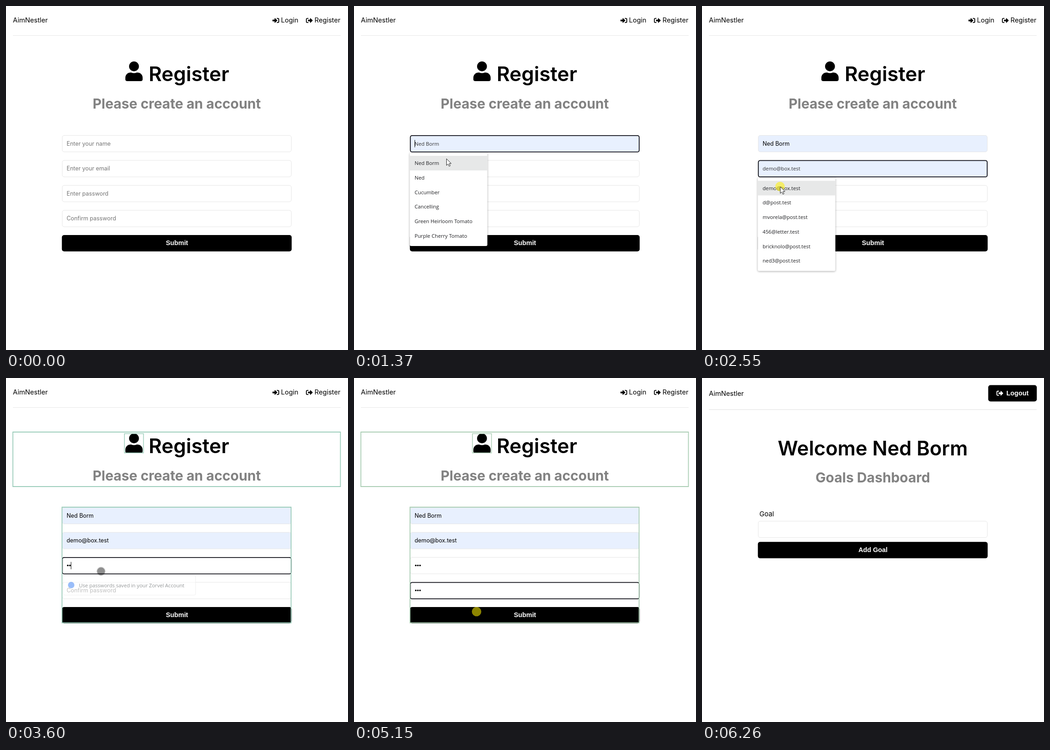
These frames come from a looping animation (745x751 px, 6870 ms). An HTML page with a canvas:

```html
<!DOCTYPE html>
<html lang="en">
<head>
<meta charset="utf-8">
<title>Register form</title>
<style>
  html, body { margin: 0; width: 100%; height: 100%; overflow: hidden; background: #fff; }
  canvas { display: block; }
</style>
</head>
<body>
<canvas id="stage" width="745" height="751"></canvas>
<script>
const ctx = document.getElementById('stage').getContext('2d');
const LOOP = 6870;
const PAGE_FONT = 'Inter, sans-serif';
const BUTTON_FONT = '"Liberation Sans", Arial, sans-serif';
const POPUP_FONT = '"Open Sans", "Noto Sans", sans-serif';
const BORDER = '#e6e6e6', AUTOFILL = '#e8f0fe';

// Event times in ms
const FOCUS = [910, 2030, 3000, 4320];
const NAME_FILLED = 1590, EMAIL_FILLED = 2600;
const PASSWORD_KEYS = [3340, 3550, 3760], CONFIRM_KEYS = [4480, 4570, 4640];
const LOADING = 5250, LOGGED_IN = 5640, DASHBOARD = 5900;
const CLICKS = [[910, 1010], [1510, 1590], [2030, 2130], [2540, 2640], [3000, 3090], [4320, 4410], [5130, 5230]];
const ARROWS = [[1160, 1590], [2250, 2600]];
const UPDATES = [[1590, 1940], [2600, 2950], [3340, 4010], [4480, 5250]];

const PATH = [
  [140, 666, 741], [300, 480, 632], [480, 350, 545], [620, 290, 420], [810, 222, 303],
  [1160, 222, 303], [1310, 201, 333], [1600, 201, 333], [1890, 190, 357], [2250, 190, 357],
  [2450, 170, 394], [2650, 170, 394], [2950, 207, 422], [4100, 207, 422], [4300, 225, 470],
  [4830, 225, 470], [5080, 267, 510], [5250, 267, 510], [5790, 405, 577], [5990, 424, 585],
  [6060, 550, 640], [6110, 622, 665], [6160, 667, 713], [6210, 688, 739], [6260, 688, 739]
];

const FULL_NAME = 'Ned Borm', EMAIL = 'demo@box.test';
const MENUS = [
  [FULL_NAME, 'Ned', 'Cucumber', 'Cancelling', 'Green Heirloom Tomato', 'Purple Cherry Tomato'],
  [EMAIL, 'd@post.test', 'mvorela@post.test', '456@letter.test', 'bricknolo@post.test', 'ned3@post.test']
];
const PLACEHOLDERS = ['Enter your name', 'Enter your email', 'Enter password', 'Confirm password'];

const ICONS = {
  signIn: ['M326 96h90a64 64 0 0 1 64 64v192a64 64 0 0 1-64 64h-90', 'M20 212h160V96l172 160-172 160V300H20z'],
  signOut: ['M186 96H96a64 64 0 0 0-64 64v192a64 64 0 0 0 64 64h90', 'M180 212h152V96l160 160-160 160V300H180z']
};
for (const key in ICONS) ICONS[key] = ICONS[key].map(d => new Path2D(d));
const USER = new Path2D('M314 288h-17a175 175 0 0 1-146 0h-17A134 134 0 0 0 0 422v42a48 48 0 0 0 48 48h352a48 48 0 0 0 48-48v-42A134 134 0 0 0 314 288z');
USER.arc(224, 128, 128, 0, 2 * Math.PI);
const ARROW = new Path2D('M0 0V14.5L3.4 11.4 5.8 16.5 8.2 15.4 5.9 10.4H10.4z');

const within = (t, spans) => spans.some(([from, to]) => t >= from && t < to);
const fieldTop = i => 282 + 54.5 * i;

function text(str, x, y, size, { color = '#000', weight = 400, font = PAGE_FONT, align = 'left' } = {}) {
  ctx.font = `${weight} ${size}px ${font}`;
  ctx.fillStyle = color;
  ctx.textAlign = align;
  ctx.fillText(str, x, y);
}

function box(x, y, w, h, radius, fill, stroke, lineWidth = 1) {
  ctx.beginPath();
  ctx.roundRect(x, y, w, h, radius);
  if (fill) { ctx.fillStyle = fill; ctx.fill(); }
  if (stroke) { ctx.strokeStyle = stroke; ctx.lineWidth = lineWidth; ctx.stroke(); }
}

function disc(x, y, r, fill) {
  ctx.beginPath();
  ctx.arc(x, y, r, 0, 2 * Math.PI);
  ctx.fillStyle = fill;
  ctx.fill();
}

function icon([bracket, arrow], x, y, color) {
  ctx.save();
  ctx.translate(x, y);
  ctx.scale(14.6 / 512, 14.6 / 512);
  ctx.strokeStyle = ctx.fillStyle = color;
  ctx.lineJoin = 'round';
  ctx.lineWidth = 64;
  ctx.stroke(bracket);
  ctx.lineWidth = 40;
  ctx.stroke(arrow);
  ctx.fill(arrow);
  ctx.restore();
}

function button(label, y) {
  box(121.7, y - .2, 500.6, 35.8, 5, '#000');
  text(label, 372.4, y + 22, 14.3, { color: '#fff', weight: 700, font: BUTTON_FONT, align: 'center' });
}

function header(loggedIn) {
  text('AimNestler', 15, loggedIn ? 39 : 36, 14.6);
  ctx.fillStyle = BORDER;
  ctx.fillRect(15, loggedIn ? 68.3 : 64, 714, loggedIn ? 1.3 : 1);
  if (loggedIn) {
    box(623.5, 15.5, 105.8, 35.8, 5, '#000');
    icon(ICONS.signOut, 641.5, 26, '#fff');
    text('Logout', 663, 38, 14.3, { color: '#fff', weight: 700, font: BUTTON_FONT });
  } else {
    icon(ICONS.signIn, 580.5, 24.3, '#000');
    text('Login', 599, 36, 14.5);
    icon(ICONS.signOut, 653.5, 24.3, '#000');
    text('Register', 672, 36, 14.6);
  }
}

function subtitle(str, y) {
  text(str, 372, y, 29.9, { color: '#828282', weight: 700, align: 'center' });
}

function caret(t, since, x, y) {
  if ((t - since) % 1000 >= 500) return;
  ctx.fillStyle = '#000';
  ctx.fillRect(x, y - 8, 1, 16);
}

function field(i, t, focused, preview) {
  const y = fieldTop(i), mid = y + 18.5;
  const value = i === 0 && t >= NAME_FILLED ? FULL_NAME : i === 1 && t >= EMAIL_FILLED ? EMAIL : '';
  const keys = i === 2 ? PASSWORD_KEYS : i === 3 ? CONFIRM_KEYS : [];
  const typed = keys.filter(k => t >= k);

  box(122.5, y + .5, 499, 36, 4.5, value || preview ? AUTOFILL : '#fff', BORDER);
  if (focused) box(122.7, y + .8, 498.6, 35.9, 4, null, '#101018', 1.8);

  if (value) text(value, 132, mid + 4, 12.4);
  else if (preview) text(preview, 132, mid + 4, 11.2, { color: '#333', font: POPUP_FONT });
  else if (!typed.length) text(PLACEHOLDERS[i], 132, mid + 4, 12.4, { color: '#757575' });
  typed.forEach((_, n) => disc(134.6 + 4.6 * n, mid - .2, 1.8, '#000'));

  if (focused && !value) caret(t, typed.at(-1) ?? FOCUS[i], 132 + 4.6 * typed.length, mid);
}

function menu(i, hovered) {
  const y = fieldTop(i) + 37;
  ctx.save();
  ctx.shadowColor = 'rgba(0,0,0,.35)';
  ctx.shadowBlur = 4;
  ctx.shadowOffsetY = 1;
  box(121.5, y + 1, 169, 204, 3, '#fff');
  ctx.restore();
  if (hovered) {
    ctx.fillStyle = '#e7e8e8';
    ctx.fillRect(121.5, y + 8, 169, 32);
  }
  MENUS[i].forEach((item, n) =>
    text(item, 132, y + 28.2 + 31.7 * n, 11.2, { color: '#202124', font: POPUP_FONT }));
}

function passwordHint(t) {
  const alpha = Math.min((t - 3040) / 100, (3720 - t) / 220, 1);
  if (alpha <= 0) return;
  ctx.save();
  ctx.globalAlpha = alpha;
  box(125, 431, 288, 43, 3, '#fff', '#e2e2e2');
  disc(142, 452, 7, '#4285f4');
  text('Use passwords saved in your Zorvel Account', 159, 456.5, 11.1, { color: '#3c4043', font: POPUP_FONT });
  ctx.restore();
}

function registerPage(t, cursor) {
  header(false);
  ctx.save();
  ctx.translate(260, 121);
  ctx.scale(.084, .084);
  ctx.fillStyle = '#000';
  ctx.fill(USER);
  ctx.restore();
  text('Register', 310.7, 164, 43.9, { weight: 600 });
  subtitle('Please create an account', 224);

  const focus = FOCUS.filter(f => t >= f).length - 1;
  const open = focus === 0 && t < NAME_FILLED || focus === 1 && t < EMAIL_FILLED;
  const hovered = open && cursor.y > fieldTop(focus) + 45;
  for (let i = 0; i < 4; i++)
    field(i, t, i === focus, hovered && i === focus ? MENUS[i][0] : '');
  button('Submit', 500.2);

  if (open) menu(focus, hovered);
  passwordHint(t);
  if (within(t, UPDATES)) {
    const color = t < 4480 ? '#9ccdbb' : '#abceb4';
    box(15, 118, 713.5, 119, 0, null, color, 1.8);
    box(258, 121.5, 41.5, 42, 0, null, color, 1.5);
    box(122, 282, 499, 252.5, 0, null, color, 1.8);
  }
}

function updateOutline(x, y, w, h) {
  box(x + .5, y + .5, w - 1, h - 1, 0, null, '#d2f3f2');
  box(x + 2, y + 2, w - 4, h - 4, 0, null, '#5fbdb8');
}

function spinner(angle) {
  ctx.lineWidth = 7;
  [['#000', -.75], ['#555', .25]].forEach(([color, turn]) => {
    ctx.beginPath();
    ctx.arc(372, 375.5, 24.5, angle + turn * Math.PI, angle + (turn + .5) * Math.PI);
    ctx.strokeStyle = color;
    ctx.stroke();
  });
}

function loadingPage(t) {
  const loggedIn = t >= LOGGED_IN;
  header(loggedIn);
  ctx.fillStyle = 'rgba(0,0,0,.5)';
  ctx.fillRect(0, 0, 745, 751);
  spinner((t - (loggedIn ? LOGGED_IN : LOADING)) / 1200 * 2 * Math.PI);
  if (!loggedIn) return;

  updateOutline(13, -6, 718, 77);
  updateOutline(13, 22, 77.5, 23);
  updateOutline(640, 25, 18, 17);
  updateOutline(13, 121, 718, 122);
  updateOutline(120.5, 285, 503, 256);
  ctx.fillStyle = '#aef0f0';
  ctx.fillRect(0, 410.5, 745, 2);
  ctx.fillRect(0, 750, 745, 1);
  box(-4, 733.5, 249.5, 22, 4, '#dee1e6');
  text('Connecting...', 1.5, 747, 10.2, { color: '#45494d', font: POPUP_FONT });
}

function dashboardPage() {
  header(true);
  text('Welcome ' + FULL_NAME, 372, 169, 43.3, { weight: 600, align: 'center' });
  subtitle('Goals Dashboard', 228);
  text('Goal', 125, 301.5, 14.8);
  box(122.5, 312.5, 499, 36, 4.5, '#fff', BORDER);
  button('Add Goal', 358);
}

function cursorAt(t) {
  const next = PATH.findIndex(p => p[0] > t);
  if (next < 1) return { x: 0, y: 0, visible: false };
  const [t0, x0, y0] = PATH[next - 1], [t1, x1, y1] = PATH[next];
  const k = (t - t0) / (t1 - t0);
  return { x: x0 + (x1 - x0) * k, y: y0 + (y1 - y0) * k, visible: true };
}

function drawCursor(t, { x, y, visible }) {
  if (!visible) return;
  const arrow = within(t, ARROWS);
  if (!arrow) {
    disc(x, y, 10, 'rgba(0,0,0,.15)');
    disc(x, y, 8.5, 'rgba(0,0,0,.34)');
  }
  if (within(t, CLICKS)) disc(x, y, 10.3, 'rgba(255,240,0,.55)');
  if (arrow) {
    ctx.save();
    ctx.translate(x + .5, y + .5);
    ctx.fillStyle = '#fff';
    ctx.strokeStyle = '#222';
    ctx.lineWidth = 1;
    ctx.fill(ARROW);
    ctx.stroke(ARROW);
    ctx.restore();
  }
}

const start = performance.now();

function draw() {
  const t = (performance.now() - start) % LOOP;
  const cursor = cursorAt(t);
  ctx.fillStyle = '#fff';
  ctx.fillRect(0, 0, 745, 751);
  if (t < LOADING) registerPage(t, cursor);
  else if (t < DASHBOARD) loadingPage(t);
  else dashboardPage();
  drawCursor(t, cursor);
  requestAnimationFrame(draw);
}

draw();
</script>
</body>
</html>
```
